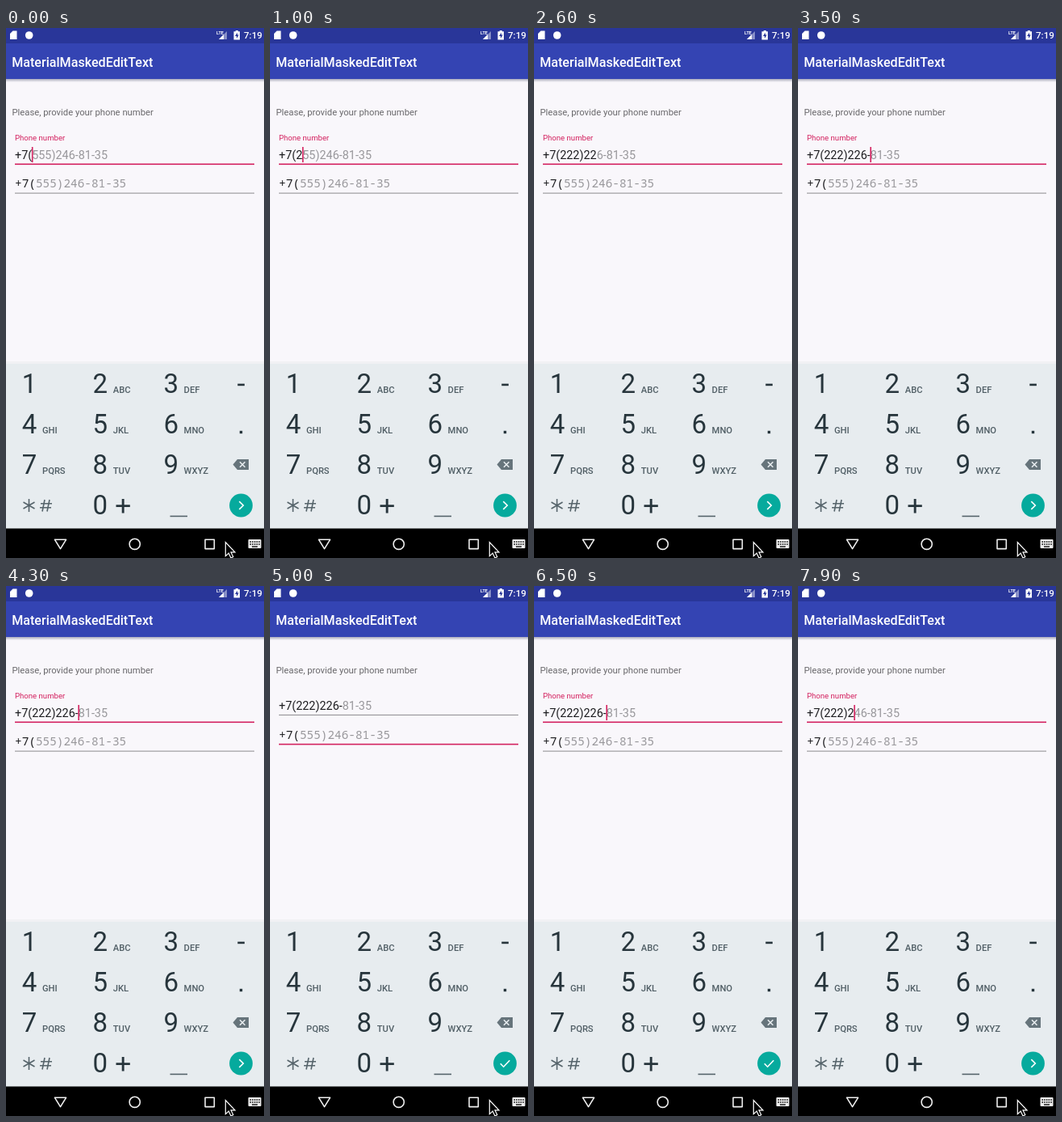
An HTML page that plays this animation: 320 by 655 pixels, repeating every 8 s.

```html
<!DOCTYPE html>
<html lang="en">
<head>
<meta charset="utf-8">
<title>Masked phone input</title>
<style>
  html, body { margin: 0; width: 100%; height: 100%; overflow: hidden; background: #f9f7fb; }
  svg { display: block; width: 320px; height: 655px; font-family: Roboto, sans-serif; }
  .typed { fill: #1d1d20; }
  .rest { fill: #98979b; }
  .field { font-size: 14.4px; }
  .mono { font-family: "Noto Sans Mono", monospace; }
  .digit { font-size: 33px; fill: #27353c; }
  .letters { font-size: 11.2px; font-weight: 500; fill: #505e65; }
  .line { fill: none; stroke-width: 1.6; }
</style>
</head>
<body>
<svg viewBox="0 0 320 655">
  <defs>
    <linearGradient id="shade" x2="0" y2="1">
      <stop stop-color="#777a92" stop-opacity=".6"/>
      <stop offset="1" stop-color="#777a92" stop-opacity="0"/>
    </linearGradient>
  </defs>
  <rect width="320" height="655" fill="#f9f7fb"/>

  <!-- status and title bars -->
  <rect y="63" width="320" height="4" fill="url(#shade)"/>
  <rect width="320" height="63" fill="#3444b3"/>
  <rect width="320" height="19" fill="#293699"/>
  <g fill="#fff">
    <path d="M8.5 3.5H13.5V14H5V7Z"/>
    <circle cx="28.7" cy="9" r="4.8"/>
    <text x="261" y="8" font-size="5.5" font-weight="700">LTE</text>
    <path d="M274 4V14H264Z" opacity=".45"/>
    <path d="M270 8V14H264Z"/>
    <path d="M284.8 3H287.8V4.3H290V14.5H282.5V4.3H284.8Z"/>
    <path d="M287 5.8L284 10H286V13L288.8 8.6H287Z" fill="#293699"/>
    <text x="295" y="13.3" font-size="11.6" font-weight="500">7:19</text>
    <text x="7.2" y="47.5" font-size="16.1" font-weight="500">MaterialMaskedEditText</text>
  </g>

  <!-- form -->
  <text x="7.5" y="107.5" font-size="11.27" fill="#69686b">Please, provide your phone number</text>
  <text id="label" x="11" y="138.5" font-size="9.6" fill="#d3215f">Phone number</text>
  <g id="form">
    <text class="field" x="11" y="161.8"><tspan class="typed" id="typed"></tspan><tspan class="rest" id="rest"></tspan></text>
    <rect id="line1" x="11" width="297"/>
    <text class="field mono" x="11" y="197.3"><tspan class="typed" id="prefix"></tspan><tspan class="rest" id="hint"></tspan></text>
    <rect id="line2" x="11" width="297"/>
    <rect id="caret" width="1.6" height="19" fill="#d3215f"/>
  </g>

  <!-- keyboard -->
  <rect y="412" width="320" height="3" fill="#f1f1f4"/>
  <rect y="415" width="320" height="204" fill="#e7ecef"/>
  <g id="keys"></g>
  <g fill="#27353c">
    <rect x="287.3" y="439.6" width="8.6" height="2.6"/>
    <rect x="289.8" y="497.8" width="3.4" height="3.4"/>
    <path d="M136.5 589.3H143.7V582H146.6V589.3H153.8V592.1H146.6V599.4H143.7V592.1H136.5Z"/>
    <rect x="203.5" y="602.6" width="21.5" height="1.6" fill="#56646b"/>
  </g>
  <g class="line" stroke="#56646b" stroke-width="1.4">
    <path d="M28.5 582V598M21.5 586L35.5 594M35.5 586L21.5 594"/>
    <path d="M48 583L45 597.5M54 583L51 597.5M43 587.7H57M42 592.8H56"/>
  </g>
  <path d="M281.5 539.5L287 533H301V546H287Z" fill="#66747b"/>
  <path class="line" d="M290 536.3L296.5 542.8M296.5 536.3L290 542.8" stroke="#e7ecef"/>
  <circle cx="291.5" cy="590" r="14.4" fill="#06aa9d"/>
  <path class="line" id="action" stroke="#fff"/>

  <!-- navigation bar -->
  <rect y="618.5" width="320" height="36.5" fill="#000"/>
  <g class="line" stroke="#eee" stroke-width="1.4" stroke-linejoin="round">
    <path d="M60.5 632.3H74.5L67.5 643.6Z"/>
    <circle cx="159.7" cy="637.8" r="6.6"/>
    <rect x="247" y="632.3" width="11.3" height="11.3"/>
  </g>
  <rect x="300.5" y="632" width="16" height="11" rx="1" fill="#eee"/>
  <path d="M302.5 635H315M302.5 638H315" stroke="#000" stroke-width="1.5" stroke-dasharray="1.5 1.2"/>
  <path d="M305 641H312" stroke="#000" stroke-width="1.3"/>
  <path d="M272.3 635.6V652.6L276.2 649L279 655L281.8 653.6L279 647.9H284Z" fill="#000" stroke="#fff" stroke-width="1.2"/>
</svg>
<script>
const $ = id => document.getElementById(id);
const mask = '+7(555)246-81-35', LOOP = 8000;

// [time, visible input]; each edit restarts the caret blink
const edits = [
  [0, '+7('], [900, '+7(2'], [1200, '+7(22'], [1500, '+7(222)'],
  [1800, '+7(222)2'], [2050, '+7(222)22'], [3200, '+7(222)226-'],
  [7050, '+7(222)22'], [7550, '+7(222)2']
];
const focusChanges = [0, 4450, 6400];
const actionChanges = [4550, 6650];
const arrow = 'M289.3 585.2L294.3 590L289.3 594.8';
const check = 'M285.8 590.2L289.7 594.2L297.3 586.2';

const letters = ['', 'ABC', 'DEF', 'GHI', 'JKL', 'MNO', 'PQRS', 'TUV', 'WXYZ'];
const text = (cls, x, y, s) => `<text class="${cls}" x="${x}" y="${y}">${s}</text>`;
$('keys').innerHTML = letters.map((s, i) => {
  const x = 19.8 + i % 3 * 87.8, y = 451.3 + Math.floor(i / 3) * 50;
  return text('digit', x, y, i + 1) + text('letters', x + 25.2, y, s);
}).join('') + text('digit', 107.6, 601.3, 0);

$('prefix').textContent = mask.slice(0, 3);
$('hint').textContent = mask.slice(3);

function setLine(id, y, active) {
  const line = $(id);
  line.setAttribute('y', active ? y - 0.5 : y - 0.4);
  line.setAttribute('height', active ? 1.6 : 1);
  line.setAttribute('fill', active ? '#d3215f' : '#8c8b8e');
}

function draw(now) {
  const t = now % LOOP;
  const [editTime, value] = edits.findLast(e => e[0] <= t);
  const focusTime = focusChanges.findLast(f => f <= t);
  const second = focusTime === focusChanges[1];

  $('typed').textContent = value;
  $('rest').textContent = mask.slice(value.length);
  $('label').setAttribute('visibility', second ? 'hidden' : 'visible');
  $('form').setAttribute('transform', `translate(0 ${second ? -8.7 : 0})`);
  setLine('line1', 168, !second);
  setLine('line2', 204, second);

  const shown = (t - Math.max(editTime, focusTime)) % 1000 < 500;
  const width = $(second ? 'prefix' : 'typed').getComputedTextLength();
  $('caret').setAttribute('visibility', shown ? 'visible' : 'hidden');
  $('caret').setAttribute('x', 10.7 + width);
  $('caret').setAttribute('y', second ? 183 : 147);

  const done = t >= actionChanges[0] && t < actionChanges[1];
  $('action').setAttribute('d', done ? check : arrow);
}

function tick() {
  draw(performance.now());
  requestAnimationFrame(tick);
}
tick();
</script>
</body>
</html>
```
